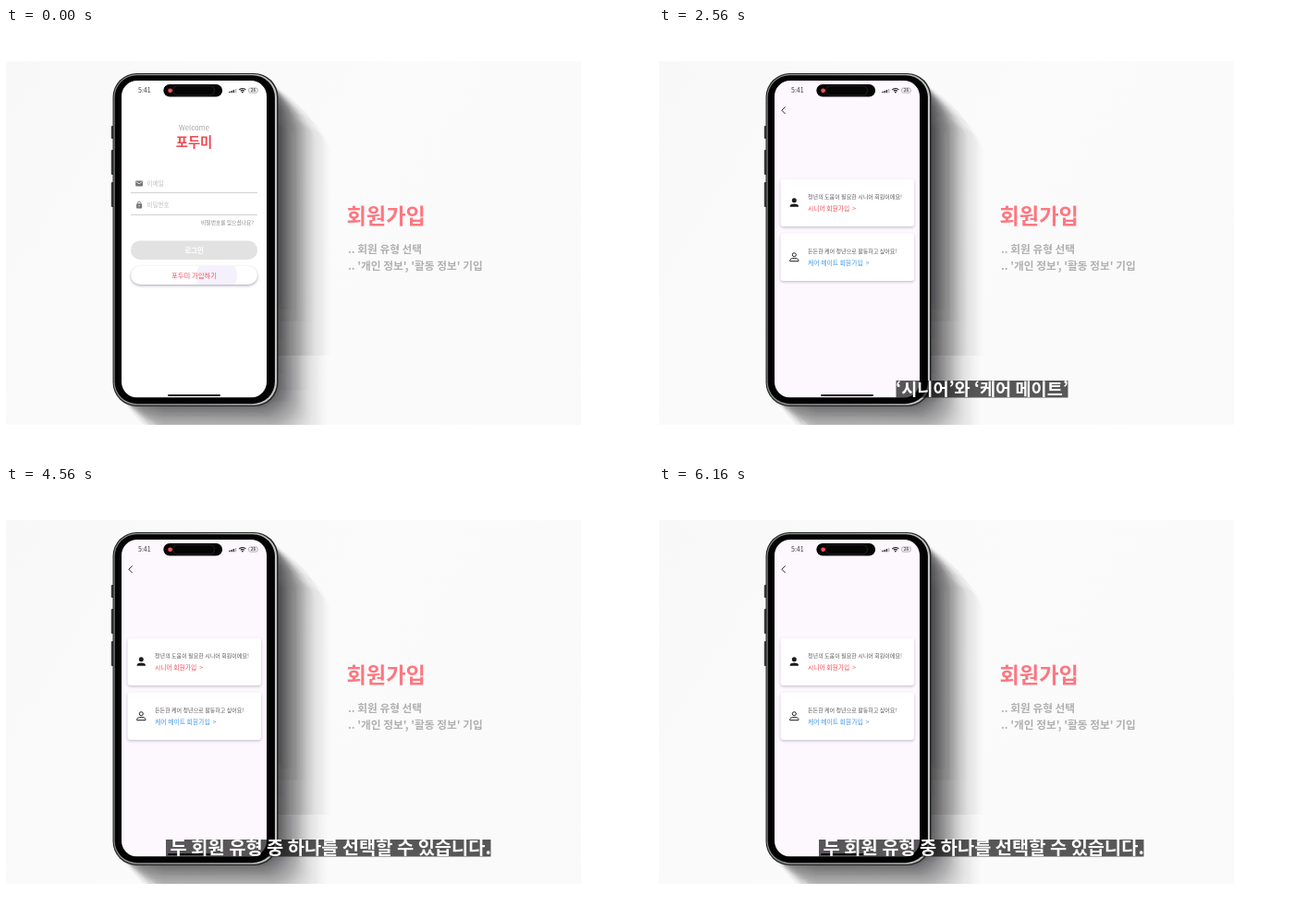
An HTML page with a canvas for the animation above (6240 ms loop, 700 by 467 pixels).

```html
<!DOCTYPE html>
<html lang="ko">
<head>
<meta charset="utf-8">
<title>회원가입</title>
<style>
html, body { margin: 0; width: 100%; height: 100%; overflow: hidden; background: #fff; }
canvas { display: block; width: 700px; height: 467px; }
</style>
</head>
<body>
<canvas id="stage"></canvas>
<script>
const W = 700, H = 467, LOOP = 6240, STEP = 80;
const FONT = '"Noto Sans CJK KR", "Noto Sans CJK", "Noto Sans", sans-serif';
const BRAND = '포두미';
const RED = '#f04c55', PINK = '#ff7680';
const SCREEN = { x: 125, y: 57, w: 157, h: 343.5, r: 17 };
const SLIDE = { start: 160, length: 480 };
const CAPTIONS = [
  { from: 480, to: 1760, x: 243, w: 212, size: 19.4, text: '회원가입 첫 번째 화면에서' },
  { from: 1760, to: 3120, x: 256.5, w: 186, size: 18.6, text: '‘시니어’와 ‘케어 메이트’' },
  { from: 3120, to: LOOP, x: 173, w: 351.5, size: 19.8, text: '두 회원 유형 중 하나를 선택할 수 있습니다.', shift: 2.5 }
];

const scale = window.devicePixelRatio || 1;

function setUp(canvas) {
  canvas.width = W * scale;
  canvas.height = H * scale;
  const c = canvas.getContext('2d');
  c.scale(scale, scale);
  return c;
}

const ctx = setUp(document.getElementById('stage'));

function box(c, x, y, w, h, r, fill, stroke, line = 1) {
  c.beginPath();
  c.roundRect(x, y, w, h, r);
  if (fill) { c.fillStyle = fill; c.fill(); }
  if (stroke) { c.strokeStyle = stroke; c.lineWidth = line; c.stroke(); }
}

function disc(c, x, y, r, fill) {
  c.beginPath();
  c.arc(x, y, r, 0, Math.PI * 2);
  c.fillStyle = fill;
  c.fill();
}

function path(c, points, color, width) {
  c.beginPath();
  points.forEach(([x, y], i) => i ? c.lineTo(x, y) : c.moveTo(x, y));
  c.strokeStyle = color;
  c.lineWidth = width;
  c.stroke();
}

function write(c, text, x, y, size, color, weight = 400, align = 'left') {
  c.font = `${weight} ${size}px ${FONT}`;
  c.textAlign = align;
  c.fillStyle = color;
  c.fillText(text, x, y);
}

function raised(c, x, y, w, h, r, blur, drop, alpha) {
  c.save();
  c.shadowColor = `rgba(40,30,60,${alpha})`;
  c.shadowBlur = blur * scale;
  c.shadowOffsetY = drop * scale;
  box(c, x, y, w, h, r, '#fff');
  c.restore();
}

function blend(c, x0, y0, x1, y1, ...colors) {
  const g = c.createLinearGradient(x0, y0, x1, y1);
  colors.forEach((color, i) => g.addColorStop(i / (colors.length - 1), color));
  return g;
}

// Long diagonal shadow made of ever fainter copies of the body, weaker towards the floor.
function drawShadow(c) {
  const reach = 80;
  const depth = d => 1.3 * Math.pow(1 - d / reach, 3.5);
  for (let d = reach - 1; d >= 0; d--) {
    const alpha = 1 - Math.exp(depth(d + 1) - depth(d));
    const tint = a => `rgba(18,18,20,${a})`;
    c.filter = `blur(${(0.6 + d * 0.15) * scale}px)`;
    box(c, 117 + d, 52 + d, 177, 357, 27,
      blend(c, 0, 280, 0, 430, tint(alpha), tint(alpha * 0.65)));
  }
  c.filter = 'none';
}

function drawBody(c) {
  for (const [y, h] of [[106, 14], [132, 27], [167, 27]])
    box(c, 113.8, y, 3, h, 1, '#343635');
  box(c, 115.5, 49, 179, 361, 26, '#242625');
  box(c, 116.6, 50.1, 176.4, 358.6, 25, blend(c, 116, 0, 293, 0, '#858988', '#9a9e9d', '#c2c5c4'));
  box(c, 117.7, 51.2, 173.2, 356, 24, '#030303');
}

function makeBackdrop() {
  const canvas = document.createElement('canvas');
  const c = setUp(canvas);
  c.fillStyle = '#fff';
  c.fillRect(0, 0, W, H);
  c.save();
  c.beginPath();
  c.rect(0, 36, 622, 394);
  c.clip();
  c.fillStyle = blend(c, 0, 36, 622, 430, '#f8f8f8', '#fbfbfb', '#f9f9f9');
  c.fillRect(0, 36, 622, 394);
  drawShadow(c);
  drawBody(c);
  c.restore();
  write(c, '회원가입', 368.5, 212, 23.2, PINK, 900);
  write(c, '.. 회원 유형 선택', 370, 244, 11.7, '#b0b0b0', 700);
  write(c, ".. '개인 정보', '활동 정보' 기입", 370, 262, 11.7, '#b0b0b0', 700);
  return canvas;
}

function drawMail(c) {
  box(c, 140.2, 165.4, 7.8, 6.2, 0.8, '#757575');
  path(c, [[140.8, 166.6], [144.1, 168.8], [147.4, 166.6]], '#fff', 0.8);
}

function drawLock(c) {
  box(c, 141.1, 190.2, 6, 5.2, 0.7, '#757575');
  c.beginPath();
  c.arc(144.1, 189.8, 1.7, Math.PI, 0);
  c.strokeStyle = '#757575';
  c.lineWidth = 0.9;
  c.stroke();
  disc(c, 144.1, 192.8, 0.7, '#fff');
}

function drawRipple(c, t) {
  const fade = 1 - Math.min(1, t / 480);
  c.save();
  c.beginPath();
  c.roundRect(135, 258, 137, 20, 10);
  c.clip();
  disc(c, 228, 268, 22 + t * 0.22, `rgba(228,216,246,${0.36 * fade})`);
  c.restore();
}

function drawLogin(c, t) {
  c.fillStyle = '#fff';
  c.fillRect(SCREEN.x, SCREEN.y, SCREEN.w, SCREEN.h);
  write(c, 'Welcome', 203.5, 111, 7.7, '#aaa6aa', 400, 'center');
  write(c, BRAND, 203.5, 129, 14.4, '#ee4a52', 900, 'center');
  drawMail(c);
  drawLock(c);
  write(c, '이메일', 152.5, 170.8, 6.7, '#bcbcbc');
  write(c, '비밀번호', 152.5, 194.2, 6.5, '#bcbcbc');
  path(c, [[135, 178.5], [272, 178.5]], '#cdcdcd', 0.9);
  path(c, [[135, 202.5], [272, 202.5]], '#cdcdcd', 0.9);
  write(c, '비밀번호를 잊으셨나요?', 268, 213, 5.75, '#858585', 400, 'right');
  box(c, 135, 230.5, 137, 20.5, 10, '#e2e2e3');
  write(c, '로그인', 203.5, 243.6, 7.5, '#fff', 700, 'center');
  raised(c, 135, 258, 137, 20, 10, 3, 1.3, 0.38);
  drawRipple(c, t);
  write(c, BRAND + ' 가입하기', 203.5, 270.8, 7.35, RED, 500, 'center');
}

function drawPerson(c, x, y, solid) {
  c.beginPath();
  c.arc(x, y - 2.4, solid ? 2.5 : 2, 0, Math.PI * 2);
  c.moveTo(x - 4.6, y + 4.6);
  c.lineTo(x - 4.6, y + 3.4);
  c.bezierCurveTo(x - 4.4, y + 0.7, x + 4.4, y + 0.7, x + 4.6, y + 3.4);
  c.lineTo(x + 4.6, y + 4.6);
  c.closePath();
  c.fillStyle = c.strokeStyle = '#1d1b1f';
  c.lineWidth = 1;
  solid ? c.fill() : c.stroke();
}

function drawCard(c, y, solid, note, link, color, size) {
  raised(c, 131.5, y, 144.5, 51.5, 3, 3, 1.2, 0.26);
  drawPerson(c, 146.3, y + 25.6, solid);
  write(c, note, 161, y + 21.8, 6.05, '#5a575b');
  write(c, link + '  >', 161, y + 34.8, size, color, 500);
}

function drawChoice(c) {
  c.fillStyle = '#fdf7fe';
  c.fillRect(SCREEN.x, SCREEN.y, SCREEN.w, SCREEN.h);
  path(c, [[136.6, 85.4], [132.8, 89.2], [136.6, 93]], '#2c2a2d', 1);
  drawCard(c, 163.5, true, '청년의 도움이 필요한 시니어 회원이에요!', '시니어 회원가입', RED, 6.8);
  drawCard(c, 222.5, false, '든든한 케어 청년으로 활동하고 싶어요!', '케어 메이트 회원가입', '#3f97e8', 6.85);
}

function drawStatus(c) {
  write(c, '5:41', 143, 70.2, 7, '#3a3a3a', 500);
  box(c, 170.3, 61, 63.8, 13.4, 6.7, '#050505');
  box(c, 180.5, 62.6, 45, 10.4, 5.2, null, '#39333d', 0.6);
  disc(c, 177.6, 67.8, 2.4, '#f4505a');
  for (let i = 0; i < 4; i++)
    box(c, 241.2 + i * 2.2, 68.8 - i * 0.9, 1.5, 1.4 + i * 0.9, 0.3, i < 3 ? '#333' : '#b5b5b5');
  c.strokeStyle = '#222';
  c.lineWidth = 1.1;
  for (const r of [2.6, 4.7]) {
    c.beginPath();
    c.arc(255.8, 70.2, r, -Math.PI * 0.77, -Math.PI * 0.23);
    c.stroke();
  }
  disc(c, 255.8, 69.6, 0.9, '#222');
  box(c, 262.6, 65, 9.6, 5.2, 1.7, '#f0f0f0', '#8a8a8a', 0.6);
  write(c, '26', 267.4, 69.4, 4.6, '#555', 700, 'center');
  box(c, 175, 397, 57, 1.9, 0.95, '#242424');
}

function drawScreen(c, t) {
  const p = Math.min(1, Math.max(0, (t - SLIDE.start) / SLIDE.length));
  const eased = 1 - Math.pow(1 - p, 3);
  c.save();
  c.beginPath();
  c.roundRect(SCREEN.x, SCREEN.y, SCREEN.w, SCREEN.h, SCREEN.r);
  c.clip();
  if (p < 1) {
    c.save();
    c.translate(-SCREEN.w / 3 * eased, 0);
    drawLogin(c, t);
    c.restore();
  }
  if (p > 0) {
    c.translate(SCREEN.w * (1 - eased), 0);
    drawChoice(c);
  }
  c.restore();
  drawStatus(c);
}

function drawCaption(c, t) {
  const cap = CAPTIONS.find(k => t >= k.from && t < k.to);
  if (!cap) return;
  c.fillStyle = 'rgba(0,0,0,0.65)';
  c.fillRect(cap.x, 382, cap.w, 18.5);
  write(c, cap.text, cap.x + cap.w / 2 + (cap.shift || 0), 397.8, cap.size, '#fff', 700, 'center');
}

const backdrop = makeBackdrop();
const begin = performance.now();

function frame() {
  const t = Math.floor(((performance.now() - begin) % LOOP) / STEP) * STEP;
  ctx.drawImage(backdrop, 0, 0, W, H);
  drawScreen(ctx, t);
  drawCaption(ctx, t);
  requestAnimationFrame(frame);
}
frame();
</script>
</body>
</html>
```
